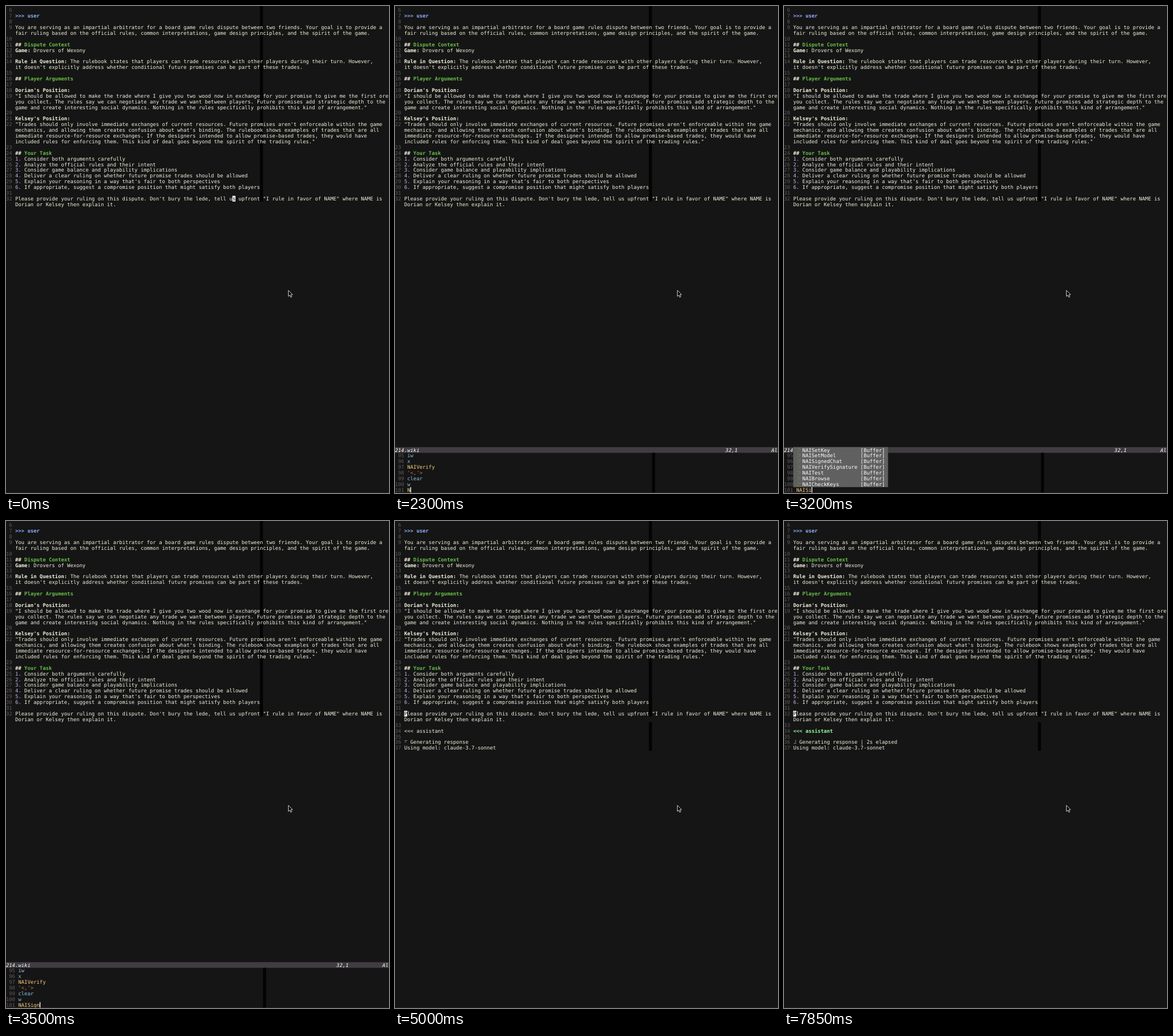
Animation of 664 by 844 pixels, one loop 8000 ms. Source, as an HTML page with a canvas:

```html
<!DOCTYPE html>
<html lang="en">
<head>
<meta charset="utf-8">
<style>
  html, body { margin: 0; width: 100%; height: 100%; overflow: hidden; background: #151515; }
  canvas { display: block; }
</style>
</head>
<body>
<canvas id="screen" width="664" height="844"></canvas>
<script>
const ctx = document.getElementById('screen').getContext('2d');
const LOOP = 8000, TICK = 50;
const CELL = 5.304, ROW = 9.9, TOP = 2.2, SIZE = 8.81;
const C = {
  bg: '#151515', fg: '#f2f2de', dim: '#605958', column: '#030303', heading: '#66c047',
  number: '#c6b6ee', user: '#8fb0ff', assistant: '#98fb98', command: '#8fbfdc',
  name: '#fad07a', range: '#d9704c', status: '#403c41', menu: '#606060', thumb: '#4f5258',
  icon: '#71894f', white: '#ffffff'
};

// "+" marks a wrapped continuation row, which has no line number.
const FIRST_LINE = 5;
const prompt = `

>>> user

You are serving as an impartial arbitrator for a board game rules dispute between two friends. Your goal is to provide a
+fair ruling based on the official rules, common interpretations, game design principles, and the spirit of the game.

## Dispute Context
Game: Drovers of Wexony

Rule in Question: The rulebook states that players can trade resources with other players during their turn. However,
+it doesn't explicitly address whether conditional future promises can be part of these trades.

## Player Arguments

Dorian's Position:
"I should be allowed to make the trade where I give you two wood now in exchange for your promise to give me the first ore
+you collect. The rules say we can negotiate any trade we want between players. Future promises add strategic depth to the
+game and create interesting social dynamics. Nothing in the rules specifically prohibits this kind of arrangement."

Kelsey's Position:
"Trades should only involve immediate exchanges of current resources. Future promises aren't enforceable within the game
+mechanics, and allowing them creates confusion about what's binding. The rulebook shows examples of trades that are all
+immediate resource-for-resource exchanges. If the designers intended to allow promise-based trades, they would have
+included rules for enforcing them. This kind of deal goes beyond the spirit of the trading rules."

## Your Task
1. Consider both arguments carefully
2. Analyze the official rules and their intent
3. Consider game balance and playability implications
4. Deliver a clear ruling on whether future promise trades should be allowed
5. Explain your reasoning in a way that's fair to both perspectives
6. If appropriate, suggest a compromise position that might satisfy both players

Please provide your ruling on this dispute. Don't bury the lede, tell us upfront "I rule in favor of NAME" where NAME is
+Dorian or Kelsey then explain it.`.split('\n');
const ASK_ROW = 33, STATUS_ROW = 77, INPUT_ROW = 84;

const history = [['iw', C.command], ['x', C.command], ['NAIVerify', C.name],
  ["'<,'>", C.range], ['clear', C.command], ['w', C.command]];

const forN = 'NAIVerify Noh NAITest NAIModel NAISetKey NAIBrowse NAIProvider NAISetModel NAICheckKeys NAISignedChat'.split(' ');
const forNA = [...forN.filter(s => s !== 'Noh'), 'NAIVerifySignature'];
const forNAIS = 'NAISetKey NAISetModel NAISignedChat NAIVerifySignature NAITest NAIBrowse NAICheckKeys'.split(' ');
const forNAISi = ['NAISignedChat', 'NAIVerifySignature'];

// start time, typed text, completion menu
const typing = [
  [1100, ''], [2300, 'N'], [2450, 'NA', forN], [2600, 'NAI', forNA], [2750, 'NAIS', forNA],
  [3050, 'NAIS', forNAIS], [3200, 'NAISi', forNAIS], [3350, 'NAISig', forNAISi],
  [3500, 'NAISign'], [3800, 'NAISigne'], [3950, 'NAISigned'], [4100, 'NAISignedC'],
  [4250, 'NAISignedCh'], [4400, 'NAISignedChat']
];
const OPEN = 1100, ESCAPE = 4550, REPLY = 5000;

const rowY = row => TOP + row * ROW;

function box(row, col, rows, cols, color) {
  ctx.fillStyle = color;
  ctx.fillRect(col * CELL, rowY(row), cols * CELL, rows * ROW);
}

function put(row, col, text, color = C.fg, style = '') {
  ctx.font = `${style} ${SIZE}px "DejaVu Sans Mono", monospace`;
  ctx.fillStyle = color;
  [...text].forEach((ch, i) => {
    if (ch !== ' ') ctx.fillText(ch, (col + i) * CELL, rowY(row) + 8);
  });
}

function blockCursor(row, col, ch) {
  box(row, col, 1, 1, C.white);
  put(row, col, ch, C.bg);
}

function putLine(row, text) {
  const lead = /^(## |\d\.|Game:|Rule in Question:|\w+'s Position:|>>> user)/.exec(text)?.[0] ?? '';
  const rest = text.slice(lead.length);
  const isHeading = lead === '## ', isItem = /^\d/.test(lead);
  const leadColor = isItem ? C.number : lead[0] === '>' ? C.user : C.fg;
  put(row, 3, lead, leadColor, isItem ? '' : 'bold');
  put(row, 3 + lead.length, rest, isHeading ? C.heading : C.fg, isHeading ? 'bold' : '');
}

function drawPrompt() {
  box(-1, 83, ASK_ROW + 2, 1, C.column);
  let number = FIRST_LINE;
  prompt.forEach((line, i) => {
    const wrapped = line[0] === '+';
    if (!wrapped) put(i - 1, 0, String(number++).padStart(2), C.dim);
    putLine(i - 1, wrapped ? line.slice(1) : line);
  });
}

function drawMenu(items) {
  const top = INPUT_ROW - items.length;
  box(top, 3, items.length, 31, C.menu);
  if (items.length === 10) {
    box(top, 34, 10, 1, C.menu);
    box(top, 34, 4, 1, C.thumb);
  }
  items.forEach((item, i) => {
    const y = rowY(top + i);
    ctx.strokeStyle = C.icon;
    ctx.lineWidth = 0.8;
    ctx.beginPath();
    ctx.moveTo(23, y + 2.5);
    ctx.quadraticCurveTo(30, y + 1.5, 27.5, y + 5);
    ctx.lineTo(22.5, y + 8);
    ctx.stroke();
    put(top + i, 6, item, C.white);
    put(top + i, 25, '[Buffer]', C.white);
  });
}

function drawCommandWindow(t) {
  box(STATUS_ROW, 0, 1, 126, C.status);
  put(STATUS_ROW, 0, '214.wiki', C.white, 'italic');
  put(STATUS_ROW, 108, '32,1', C.white, 'italic');
  put(STATUS_ROW, 123, 'All', C.white, 'italic');
  box(STATUS_ROW + 1, 84, 7, 1, C.column);
  history.forEach(([text, color], i) => put(STATUS_ROW + 1 + i, 4, text, color));
  for (let i = 0; i < 7; i++) put(STATUS_ROW + 1 + i, 0, String(95 + i).padStart(3), C.dim);

  const [, text, menu] = typing.findLast(step => t >= step[0]);
  put(INPUT_ROW, 4, text, C.name);
  if (menu) drawMenu(menu);
  if (t >= ESCAPE) blockCursor(INPUT_ROW, 3 + text.length, text.at(-1));
  else box(INPUT_ROW, 4 + text.length, 1, 0.25, C.white);
}

function drawSpinner(row, elapsed) {
  const step = Math.floor(elapsed / 150) * 150;
  const dots = '⠋⠙⠹⠸⠼⠴⠦⠧⠇⠏'.charCodeAt(Math.floor((step + 60) / 120) % 10) - 0x2800;
  ctx.fillStyle = C.fg;
  for (let bit = 0; bit < 6; bit++) {
    if (dots >> bit & 1) ctx.fillRect(17.2 + (bit > 2) * 2.4, rowY(row) + 1.6 + bit % 3 * 2.4, 1.1, 1.1);
  }
}

function drawReply(elapsed) {
  box(ASK_ROW + 2, 83, 5, 1, C.column);
  for (let i = 0; i < 5; i++) put(ASK_ROW + 2 + i, 0, String(33 + i), C.dim);
  const colored = elapsed >= 150;
  put(36, 3, '<<< assistant', colored ? C.assistant : C.fg, colored ? 'bold' : '');
  const seconds = Math.floor(elapsed / 1050);
  drawSpinner(38, elapsed);
  put(38, 5, 'Generating response' + (seconds ? ` | ${seconds}s elapsed` : ''));
  put(39, 3, 'Using model: claude-3.7-sonnet');
}

function drawPointer() {
  ctx.beginPath();
  [[0, 0], [0, 10.4], [2.4, 8.3], [4, 12], [5.8, 11.2], [4.2, 7.6], [7.2, 7.4]]
    .forEach(([x, y]) => ctx.lineTo(489.6 + x, 492.8 + y));
  ctx.closePath();
  ctx.fillStyle = '#000';
  ctx.fill();
  ctx.strokeStyle = '#e8e8e8';
  ctx.lineWidth = 0.9;
  ctx.stroke();
}

function draw(t) {
  ctx.textRendering = 'geometricPrecision';
  ctx.fillStyle = C.bg;
  ctx.fillRect(0, 0, 664, 844);
  drawPrompt();
  if (t < 500) blockCursor(ASK_ROW, 74, 's');
  else if (t < OPEN || t >= REPLY) blockCursor(ASK_ROW, 3, 'P');
  if (t >= REPLY) drawReply(t - REPLY);
  else if (t >= OPEN) drawCommandWindow(t);
  drawPointer();
  ctx.fillStyle = '#33272a';
  ctx.fillRect(0, 843.3, 664, 0.7);
}

let lastTick = -1;
function frame() {
  const tick = Math.floor(performance.now() % LOOP / TICK);
  if (tick !== lastTick) draw(tick * TICK);
  lastTick = tick;
  requestAnimationFrame(frame);
}
frame();
</script>
</body>
</html>
```
